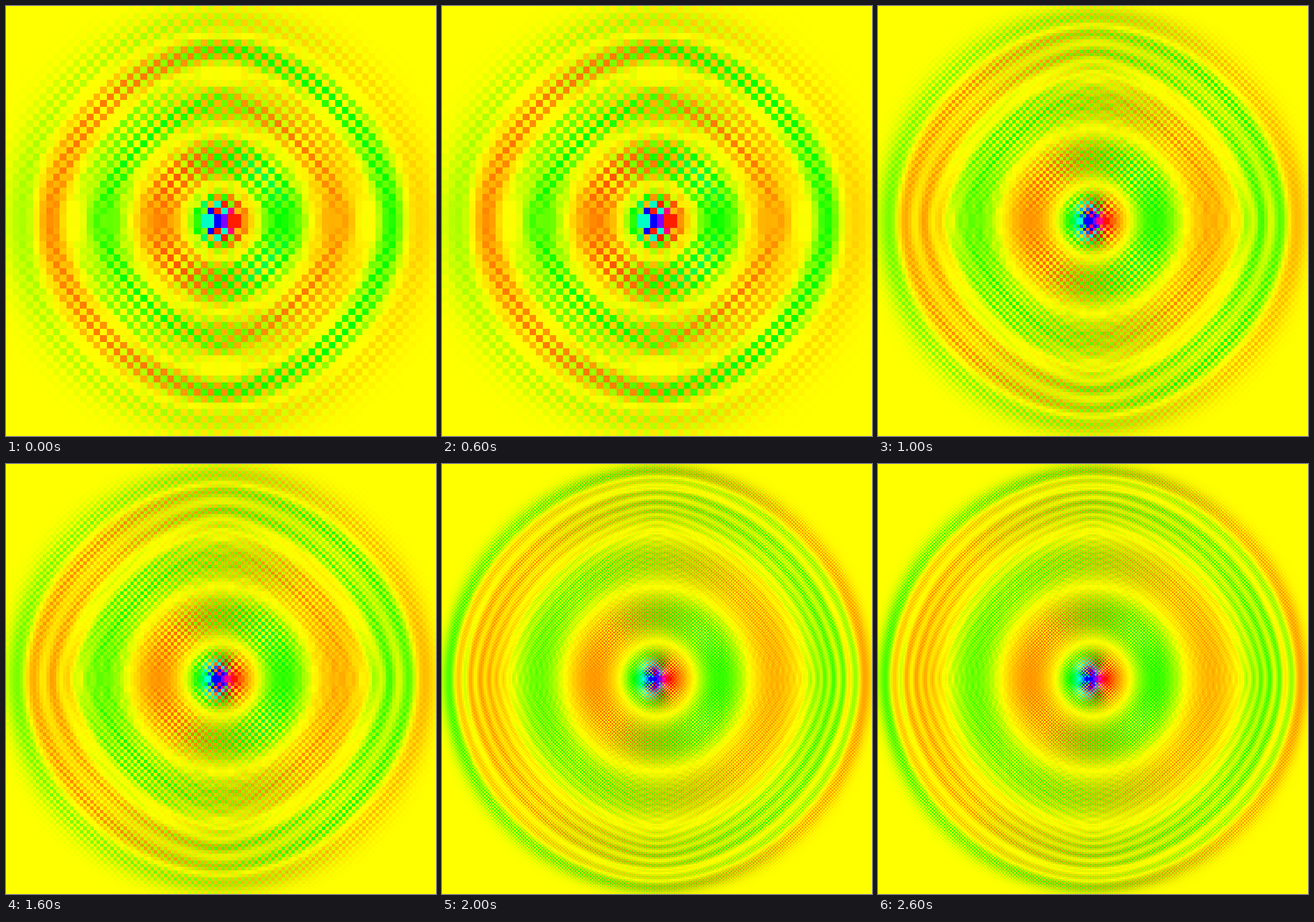
Write an HTML page with a canvas that moves like this. It is 746x746 px and loops after 3000 ms.

```html
<!DOCTYPE html>
<html lang="en">
<head>
<meta charset="utf-8">
<title>Dipole wave on three grids</title>
<style>
  html, body { margin: 0; width: 100%; height: 100%; overflow: hidden; background: #ff0; }
  canvas { display: block; }
</style>
</head>
<body>
<canvas id="stage" width="746" height="746"></canvas>
<script>
const SIZE = 746;
const HOLD = 1000;
const DT = 1 / 8;

// Leapfrog wave equation with a diagonal Laplacian. The field is odd in x and
// even in y, so one quadrant is enough; index 0 is the mirrored ghost cell.
function simulate(n) {
  const m = n / 2 + 8, w = m + 2;
  let now = new Float64Array(w * w), next = new Float64Array(w * w);
  const omega = 8 * Math.PI / n;
  const steps = n / 2 / DT;
  for (let s = 0; s < steps; s++) {
    for (let k = 1; k <= m; k++) now[k] = now[w + k];
    for (let k = 0; k <= m; k++) now[k * w] = -now[k * w + 1];
    for (let y = 1; y <= m; y++) {
      for (let x = 1, i = y * w + 1; x <= m; x++, i++) {
        const sum = now[i - w - 1] + now[i - w + 1] + now[i + w - 1] + now[i + w + 1];
        next[i] = 2 * now[i] - next[i] + DT * DT * (sum / 2 - 2 * now[i]);
      }
    }
    // The central node moves as prescribed, so its pressure response is removed.
    next[w + 1] += DT * DT * (now[w + 1] + 2.25 * n * Math.cos(omega * s * DT));
    [now, next] = [next, now];
  }
  return (x, y) => now[y * w + x];
}

// Yellow at rest; positive values run through green, negative through red.
function hueOf(v) {
  return 60 + Math.max(-150, Math.min(180, v > 0 ? 2 * v : v));
}

function channel(hue, offset) {
  const h = ((hue + offset) / 60 + 12) % 6;
  return 255 * Math.max(0, Math.min(1, Math.abs(h - 3) - 1));
}

function render(n) {
  const field = simulate(n);
  const canvas = document.createElement('canvas');
  canvas.width = canvas.height = n;
  const ctx = canvas.getContext('2d');
  const image = ctx.createImageData(n, n);
  const half = n / 2;
  const fold = k => k < half ? half - k : k - half + 1;
  for (let y = 0; y < n; y++) {
    for (let x = 0; x < n; x++) {
      const u = field(fold(x), fold(y));
      const hue = hueOf(x < half ? u : -u);
      image.data.set([channel(hue, 0), channel(hue, 240), channel(hue, 120), 255], 4 * (y * n + x));
    }
  }
  ctx.putImageData(image, 0, 0);
  return canvas;
}

const stage = document.getElementById('stage').getContext('2d');
stage.imageSmoothingEnabled = false;
const pictures = [64, 128, 256].map(render);

function draw() {
  const index = Math.floor(performance.now() / HOLD) % pictures.length;
  stage.drawImage(pictures[index], 0, 0, SIZE, SIZE);
  requestAnimationFrame(draw);
}
draw();
</script>
</body>
</html>
```
